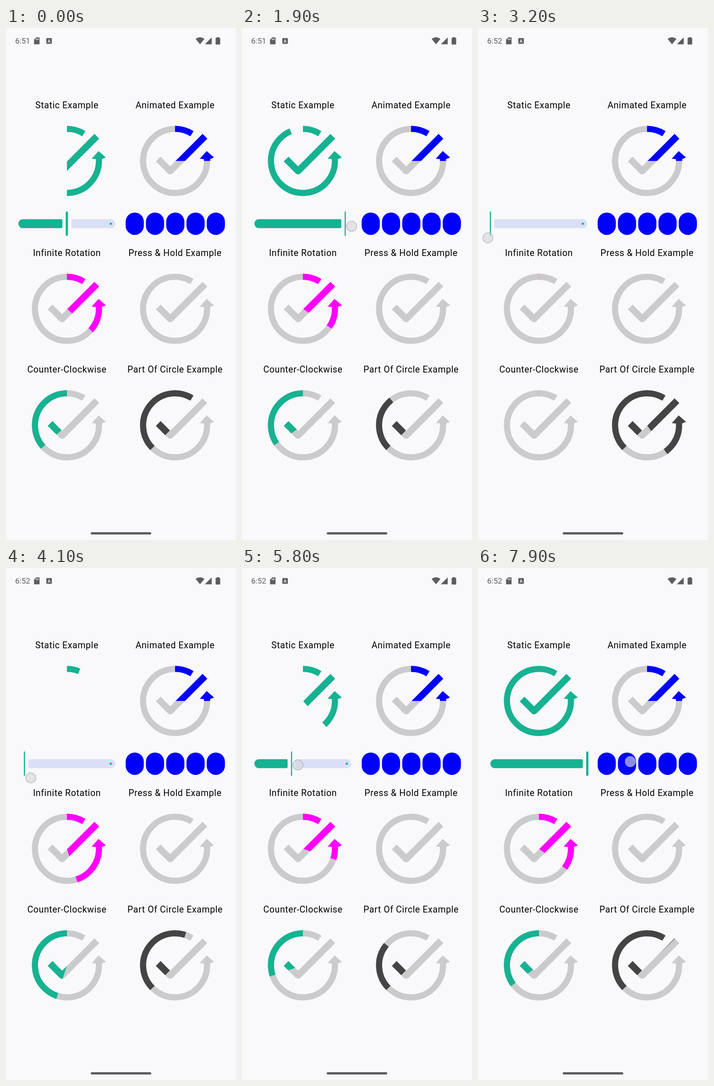
Write an HTML page with a canvas that moves like this. It is 502 px wide and 1116 px high and loops after 8 s.

```html
<!DOCTYPE html>
<html lang="en">
<head>
<meta charset="utf-8">
<title>Sweep progress icons</title>
<style>
html, body { margin: 0; width: 100%; height: 100%; overflow: hidden; background: #f9f8fa; }
canvas { display: block; width: 502px; height: 1116px; }
</style>
</head>
<body>
<canvas id="stage"></canvas>
<script>
const W = 502, H = 1116, LOOP = 8000, STEP = 100;
const BG = '#f9f8fa', TEAL = '#16b291', GREY = '#cbcacc', BLUE = '#00f',
      PINK = '#f0f', DARK = '#444', TRACK = '#d9e0f5', STATUS = '#5d5c60';
const LEFT = 133, RIGHT = 369;
const SLIDER = { x0: 27, x1: 238.5, y: 426.5, rest: 132.8 };

// Thumb drags; targets may lie beyond the ends of the track.
const DRAGS = [
  { from: 1200, to: 2000, x: 238.5 },
  { from: 2250, to: 3150, x: 7.5 },
  { from: 3850, to: 4450, x: 86 },
  { from: 5600, to: 6980, x: 238.5 }
];
const PRESSES = [{ from: 1200, to: 4650 }, { from: 5500, to: 7200 }];
const TAP = { from: 7800, x: 332.5, y: 422 };

const canvas = document.getElementById('stage');
const dpr = window.devicePixelRatio || 1;
canvas.width = W * dpr;
canvas.height = H * dpr;
const c = canvas.getContext('2d');
c.scale(dpr, dpr);

const clamp = (v, lo, hi) => Math.min(hi, Math.max(lo, v));
const rad = deg => (deg - 90) * Math.PI / 180;

function dragX(t) {
  return DRAGS.reduce((x, d) =>
    x + (d.x - x) * clamp((t - d.from) / (d.to - d.from), 0, 1), SLIDER.rest);
}

function box(x, y, w, h, r, color) {
  c.fillStyle = color;
  c.beginPath();
  c.roundRect(x, y, w, h, r);
  c.fill();
}

function disc(x, y, r, color) {
  c.fillStyle = color;
  c.beginPath();
  c.arc(x, y, r, 0, Math.PI * 2);
  c.fill();
}

function poly(points, color) {
  c.fillStyle = color;
  c.beginPath();
  points.forEach(([x, y]) => c.lineTo(x, y));
  c.closePath();
  c.fill();
}

// Check mark inside an open ring that ends in an arrowhead.
function icon(color) {
  c.strokeStyle = color;
  c.lineCap = 'butt';
  c.lineJoin = 'round';
  c.lineWidth = 13.4;
  c.beginPath();
  c.arc(0, 0, 69.8, rad(86), rad(391.8));
  c.stroke();
  c.lineWidth = 14.6;
  c.beginPath();
  c.moveTo(-36.7, -4);
  c.lineTo(-10.6, 22.1);
  c.lineTo(65.2, -53.7);
  c.stroke();
  poly([[69, -21.5], [85, -7.5], [76.4, -4], [62.7, -4], [54, -4.8]], color);
}

// Icon with an optional base colour and a coloured wedge, clockwise from the top.
function sweepIcon(x, y, base, color, start, sweep) {
  c.save();
  c.translate(x, y);
  if (base) icon(base);
  if (sweep > 0) {
    if (sweep < 359.99) {
      c.beginPath();
      c.moveTo(0, 0);
      c.arc(0, 0, 120, rad(start), rad(start + sweep));
      c.closePath();
      c.clip();
    }
    icon(color);
  }
  c.restore();
}

function slider(x, pressed) {
  const { x0, x1, y } = SLIDER;
  const half = pressed ? 1.25 : 2.45, gap = 7.3, r = 9.75, inner = 2.4;
  const end = x - half - gap, start = x + half + gap;
  if (start < x1 - r) {
    box(start, y - r, x1 - start, r * 2, [inner, r, r, inner], TRACK);
    disc(x1 - r, y, 2.5, TEAL);
  }
  if (end > x0 + r) box(x0, y - r, end - x0, r * 2, [r, inner, inner, r], TEAL);
  box(x - half, y - 26.8, half * 2, 53.6, half, TEAL);
}

function touchSpot(x, y) {
  disc(x, y, 11.5, 'rgba(215,215,217,.65)');
  c.strokeStyle = 'rgba(165,175,200,.7)';
  c.lineWidth = 1.6;
  c.beginPath();
  c.arc(x, y, 11, 0, Math.PI * 2);
  c.stroke();
}

function title(text, x, y) {
  c.font = '19.5px Roboto, sans-serif';
  c.letterSpacing = '0.61px';
  c.textAlign = 'center';
  c.fillStyle = '#000';
  c.fillText(text, x, y);
}

function statusBar(clock) {
  c.font = '17px Roboto, sans-serif';
  c.letterSpacing = '0px';
  c.textAlign = 'left';
  c.fillStyle = STATUS;
  c.fillText(clock, 20, 34);

  // Memory card
  poly([[66, 20.5], [73.2, 20.5], [73.2, 35.5], [61.2, 35.5], [61.2, 25.5]], STATUS);
  for (let i = 0; i < 3; i++) box(65 + i * 2.4, 23, 1.3, 3.2, 0, BG);

  // Letter badge
  box(88, 22, 12, 12.5, 1.2, STATUS);
  c.font = 'bold 9px Roboto, sans-serif';
  c.textAlign = 'center';
  c.fillStyle = BG;
  c.fillText('A', 94, 31.5);

  // Wireless fan, signal and battery
  c.fillStyle = STATUS;
  c.beginPath();
  c.moveTo(423.5, 35.5);
  c.lineTo(414, 24);
  c.quadraticCurveTo(423.5, 16.5, 433, 24);
  c.closePath();
  c.fill();
  poly([[449, 20.5], [449, 35.5], [434, 35.5]], STATUS);
  box(460, 20, 5, 3, 0, STATUS);
  box(457.5, 21.5, 10, 14.5, 1.2, STATUS);
}

function draw(t) {
  // The shared clock starts slightly late and catches up.
  const phase = t / 2000 + .402 - .035 * Math.exp(-t / 1000);
  const turn = phase % 1 * 360;
  const swing = 280 * Math.abs(1 - phase % 2);
  const rawX = dragX(t);
  const x = clamp(rawX, SLIDER.x0, SLIDER.x1);
  const value = (x - SLIDER.x0) / (SLIDER.x1 - SLIDER.x0);
  const press = PRESSES.find(p => t >= p.from && t < p.to);

  c.fillStyle = BG;
  c.fillRect(0, 0, W, H);
  statusBar(t < 2400 ? '6:51' : '6:52');

  ['Static Example', 'Infinite Rotation', 'Counter-Clockwise']
    .forEach((s, i) => title(s, LEFT, [174.5, 496.5, 750.5][i]));
  ['Animated Example', 'Press & Hold Example', 'Part Of Circle Example']
    .forEach((s, i) => title(s, RIGHT, [174.5, 496.5, 750.5][i]));

  sweepIcon(LEFT, 289.7, null, TEAL, 0, value * 360);
  sweepIcon(RIGHT, 289.7, GREY, BLUE, 0, 90);
  sweepIcon(LEFT, 612, GREY, PINK, 0, turn);
  sweepIcon(RIGHT, 612, GREY, PINK, 0, 0);
  sweepIcon(LEFT, 866, GREY, TEAL, 360 - turn, turn);
  sweepIcon(RIGHT, 866, GREY, DARK, 225, swing);

  slider(x, press && t > press.from);
  for (let i = 0; i < 5; i++) box(261.2 + i * 44.25, 402.2, 39.6, 48.7, 19.8, BLUE);
  box(185, 1099, 132, 5, 2.5, STATUS);

  if (press) {
    // The finger leads the thumb by the drag slop and sinks as it moves.
    const age = t - press.from;
    touchSpot(rawX + 1 + 13 * Math.min(1, age / 150),
              428.5 + 29 * Math.min(1, age / 2000) ** 2);
  }
  if (t >= TAP.from) touchSpot(TAP.x, TAP.y);
}

const origin = performance.now();
function tick() {
  const t = (performance.now() - origin) % LOOP;
  draw(Math.floor(t / STEP) * STEP);
  requestAnimationFrame(tick);
}
tick();
</script>
</body>
</html>
```
